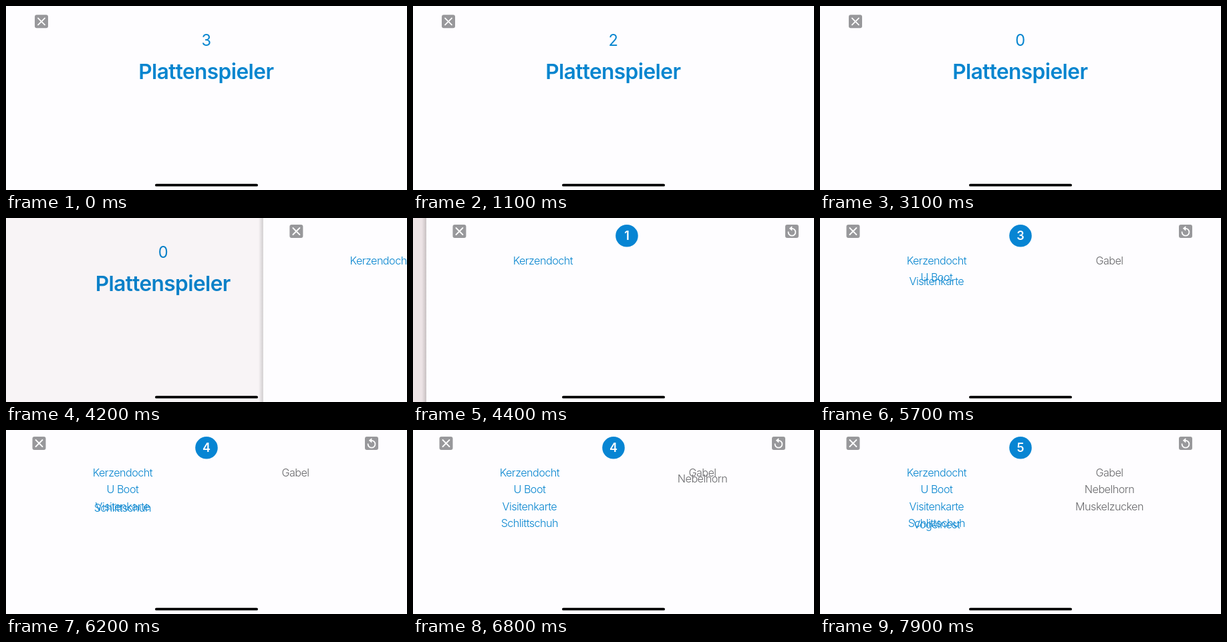
Write an HTML page that moves like this. It is 600 by 277 pixels and loops after 8 s.

```html
<!DOCTYPE html>
<html lang="de">
<head>
<meta charset="utf-8">
<title>Wortspiel</title>
<style>
html, body { margin: 0; height: 100%; overflow: hidden; background: #fefdff; }
svg { display: block; width: 600px; height: 277px; }
text { font-family: Inter, "Liberation Sans", sans-serif; text-anchor: middle; fill: #0785cf; }
.title { font-size: 31.6px; font-weight: 600; letter-spacing: -.018em; }
.count { font-size: 23.6px; font-weight: 400; }
.word { font-size: 16.2px; font-weight: 300; letter-spacing: -.033em; }
.miss { fill: #69696c; }
.badge { font-size: 18px; font-weight: 600; fill: #fff; }
.line { fill: none; stroke: #fff; stroke-width: 1.8; stroke-linecap: round; }
</style>
</head>
<body>
<svg viewBox="0 0 600 277">
  <defs>
    <linearGradient id="shadow">
      <stop offset="0" stop-color="#000" stop-opacity="0"/>
      <stop offset="1" stop-color="#000" stop-opacity=".16"/>
    </linearGradient>
    <clipPath id="list"><rect y="51" width="600" height="226"/></clipPath>
    <g id="close">
      <rect width="20" height="20" rx="3" fill="#98989b"/>
      <path class="line" d="M5 5 15 15M15 5 5 15"/>
    </g>
  </defs>
  <g id="intro">
    <use href="#close" x="43" y="13.3"/>
    <text id="count" class="count" x="299.7" y="60.3"></text>
    <text class="title" x="299.3" y="110.2">Plattenspieler</text>
  </g>
  <rect id="shade" width="600" height="277" fill="#500"/>
  <g id="game">
    <rect x="-7" width="7" height="277" fill="url(#shadow)"/>
    <rect width="600" height="277" fill="#fefdff"/>
    <use href="#close" x="39.5" y="10"/>
    <g transform="translate(537 10)">
      <rect width="20" height="20" rx="3" fill="#98989b"/>
      <path class="line" d="M10 5.8A5.4 5.4 0 1 1 4.6 11.2"/>
      <path d="M10.3 2V9.6L5.8 5.8Z" fill="#fff"/>
    </g>
    <circle cx="300" cy="26.8" r="16.8" fill="#0785d3"/>
    <text id="badge" class="badge" x="300" y="33.3"></text>
    <g id="words" clip-path="url(#list)"></g>
  </g>
  <rect x="223" y="267.8" width="154" height="3.7" rx="1.85"/>
</svg>
<script>
const LOOP = 8000, PUSH = 4171, SLIDE = 300, ROW = 25.5, TOP = 69.8;
const $ = id => document.getElementById(id);

// [word, time of entry, belongs to the right column]
const rows = [0, 0];
const words = [
  ['Kerzendocht', 0],
  ['Gabel', 4610, true],
  ['U Boot', 5060],
  ['Visitenkarte', 5605],
  ['Schlittschuh', 6150],
  ['Nebelhorn', 6680, true],
  ['Muskelzucken', 7260, true],
  ['Vogelnest', 7848]
].map(([label, start, miss]) => {
  const el = document.createElementNS('http://www.w3.org/2000/svg', 'text');
  el.textContent = label;
  el.setAttribute('class', miss ? 'word miss' : 'word');
  el.setAttribute('x', miss ? 433 : 174.4);
  $('words').append(el);
  return { el, start, miss, row: rows[miss ? 1 : 0]++ };
});

const ease = p => p * p * (3 - 2 * p);

function draw(t) {
  $('count').textContent = Math.max(0, 3 - Math.floor(t / 1000));

  const push = t < PUSH ? 0 : 1 - Math.exp((PUSH - t) * .0148);
  $('intro').setAttribute('transform', `translate(${-180 * push})`);
  $('shade').setAttribute('opacity', .1 * push);
  $('game').setAttribute('transform', `translate(${600 * (1 - push)})`);
  $('game').setAttribute('visibility', push ? 'visible' : 'hidden');

  let hits = 0;
  for (const { el, start, miss, row } of words) {
    const shown = t >= start;
    const p = start ? Math.min(1, Math.max(0, (t - start) / SLIDE)) : 1;
    el.setAttribute('display', shown ? 'inline' : 'none');
    el.setAttribute('y', TOP + ROW * (row - 1 + ease(p)));
    if (shown && !miss) hits++;
  }
  $('badge').textContent = hits;
}

const begin = performance.now();
function tick() {
  draw((performance.now() - begin) % LOOP);
  requestAnimationFrame(tick);
}
tick();
</script>
</body>
</html>
```
